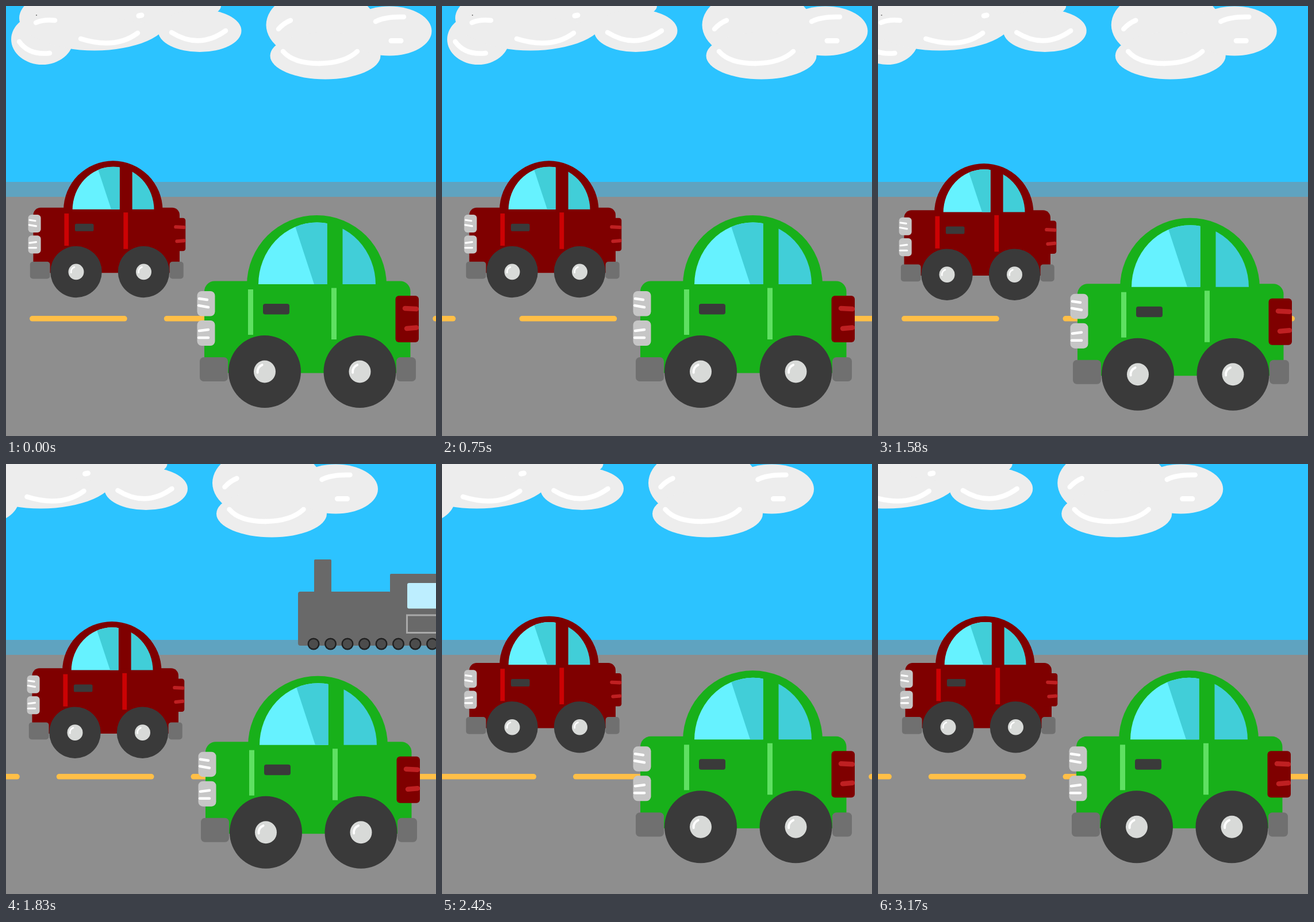
Write an HTML page with a canvas that moves like this. It is 748x748 px and loops after 3.25 s.

```html
<!DOCTYPE html>
<html lang="en">
<head>
<meta charset="utf-8">
<title>Two cars</title>
<style>
html, body { margin: 0; width: 100%; height: 100%; overflow: hidden; background: #8e8e8e; }
canvas { display: block; width: 748px; height: 748px; }
</style>
</head>
<body>
<canvas id="stage" width="748" height="748"></canvas>
<script>
const ctx = document.getElementById('stage').getContext('2d');
const SIZE = 748, LOOP = 3250, TICK = 1000 / 12;
const UNIT = SIZE / 16;

// inset: how far the frame reaches into the windows
const GREEN = { body: '#18b01a', trim: '#5fe062', inset: 1, stripe: 9 };
const RED = { body: '#7f0000', trim: '#cc0204', inset: 3, stripe: 11 };

function rect(x0, y0, x1, y1, color, r = 0) {
  ctx.fillStyle = color;
  ctx.beginPath();
  ctx.roundRect(x0, y0, x1 - x0, y1 - y0, r);
  ctx.fill();
}

function oval(x, y, rx, ry, color) {
  ctx.fillStyle = color;
  ctx.beginPath();
  ctx.ellipse(x, y, rx, ry, 0, 0, 7);
  ctx.fill();
}

function line(x0, y0, x1, y1, color, width) {
  curve(x0, y0, (x0 + x1) / 2, (y0 + y1) / 2, x1, y1, color, width);
}

function curve(x0, y0, cx, cy, x1, y1, color = '#fff', width = 8.5) {
  ctx.strokeStyle = color;
  ctx.lineWidth = width;
  ctx.lineCap = 'round';
  ctx.beginPath();
  ctx.moveTo(x0, y0);
  ctx.quadraticCurveTo(cx, cy, x1, y1);
  ctx.stroke();
}

function at(x, y, scale, draw) {
  ctx.save();
  ctx.translate(x, y);
  ctx.scale(scale, scale);
  draw();
  ctx.restore();
}

function clouds() {
  const c = '#ededed';
  oval(63, 58, 54, 44, c);
  oval(100, 21, 77, 45, c);
  oval(154, 20, 130, 57.5, c);
  oval(270, 0, 104, 30, c);
  oval(337, 43, 72.5, 37, c);
  curve(23, 62, 40, 86, 76, 82);
  curve(52, 29, 65, 23, 85, 25);
  curve(130, 57, 190, 76, 229, 47);
  curve(288, 46, 336, 76, 382, 43);
  line(231, 17, 236, 16, '#fff', 9);
  rect(52, 15, 54, 17, '#888');

  oval(548, 33, 95.5, 62, c);
  oval(555.5, 86.5, 96, 41, c);
  oval(667, 43.5, 73.5, 43, c);
  curve(474, 40, 483, 30, 495, 25);
  curve(482, 79, 500, 100, 545, 100);
  curve(545, 100, 590, 99, 611, 79);
  curve(643, 27, 660, 18, 692, 19);
  line(670, 60.5, 687, 60.5, '#fff', 9);
}

// x = 0 is the rear edge of the cab
function train() {
  rect(-130, 191, 0, 316, '#696969', 2);
  rect(-290, 222, -128, 316, '#696969', 4);
  rect(-262, 166, -232, 224, '#696969', 2);
  rect(-100, 207, -12, 251.5, '#bdeeff', 3);
  ctx.strokeStyle = '#a9a9a9';
  ctx.lineWidth = 3;
  ctx.strokeRect(-100.5, 263, 71, 30.5);
  for (let i = 0; i < 9; i++) {
    const x = -27 - i * 29.5;
    oval(x, 313, 10.5, 10.5, '#202020');
    oval(x, 313, 8, 8, '#4c4c4c');
  }
}

function road(step) {
  const shift = step * 2 % 16;
  const dash = n => {
    const x = 41 + n * UNIT;
    line(x + 4.8, 543.8, x + 165, 543.8, '#ffbf47', 9.6);
  };
  for (const n of [0, 5, 10]) {
    const p = (n + shift) % 16;
    dash(p);
    dash(p - 16);
  }
  if (shift === 0) dash(15);
}

function glass(inset) {
  const left = 559.5 - inset, right = 584.5 + inset, sill = 484.5 - inset / 2;
  ctx.save();
  ctx.beginPath();
  ctx.ellipse(541, 485, 103 - inset, 109.5 - inset, 0, 0, 7);
  ctx.clip();
  rect(437, 370, left, sill, '#66f2ff');
  ctx.fillStyle = '#41ced8';
  ctx.beginPath();
  ctx.moveTo(500, 374);
  ctx.lineTo(left, 370);
  ctx.lineTo(left, sill);
  ctx.lineTo(536, sill);
  ctx.fill();
  rect(right, 370, 645, sill, '#41ced8');
  ctx.restore();
}

function wheel(x) {
  oval(x, 636, 63, 63, '#3a3a3a');
  oval(x, 636, 19, 19.5, '#d8dad8');
  ctx.strokeStyle = '#fff';
  ctx.lineWidth = 4;
  ctx.beginPath();
  ctx.arc(x, 636, 12.5, 3, 4.35);
  ctx.stroke();
}

function car(paint) {
  oval(540.5, 485.5, 121.5, 121.5, paint.body);
  rect(345, 478.5, 703.5, 638.5, paint.body, 18);
  rect(337, 611, 386, 653, '#707070', 7);
  rect(679, 611, 713, 653, '#707070', 7);
  glass(paint.inset);
  rect(421, 493, 421 + paint.stripe, 572, paint.trim);
  rect(566, 490.5, 566 + paint.stripe, 580, paint.trim);
  rect(447, 518, 493, 536.5, '#3a3a3a', 4);

  rect(332.5, 496, 363.5, 539.5, '#c6c6c6', 8);
  rect(332.5, 547, 363.5, 591, '#c6c6c6', 8);
  line(336, 509, 350, 511, '#fff', 4.5);
  line(335, 521, 352, 524, '#fff', 4.5);
  line(336, 565, 352, 563, '#fff', 4.5);
  line(335, 577, 352, 577, '#fff', 4.5);

  rect(677.5, 504, 718, 585, '#7f0000', 6);
  line(694, 526, 714, 527, '#bf2022', 8.5);
  line(697, 561, 714, 559.5, '#bf2022', 8.5);

  wheel(450);
  wheel(615.5);
}

function render(ms) {
  const t = (ms + 4) % LOOP;   // steps snap to hundredths of a second
  const step = Math.floor(t / TICK);

  rect(0, 0, SIZE, 306, '#2cc3ff');
  rect(0, 306, SIZE, 332, '#5fa3c0');
  rect(0, 332, SIZE, SIZE, '#8e8e8e');

  at(-UNIT * Math.floor(t / 875), 0, 1, clouds);

  const pass = Math.floor((t - 1750) / 125);
  if (pass >= 0 && pass < 3) at(50 + (2 - pass) * SIZE / 2, 0, 1, train);

  road(step);

  const [dx, dy] = [[0, 0], [2, 4.7], [0, -4.7]][step % 3];
  at(-197.5 - dx, 10.9 + dy, 0.71, () => car(RED));
  at(dx, dy, 1, () => car(GREEN));
}

const start = performance.now();
function loop() {
  render(performance.now() - start);
  requestAnimationFrame(loop);
}
loop();
</script>
</body>
</html>
```
